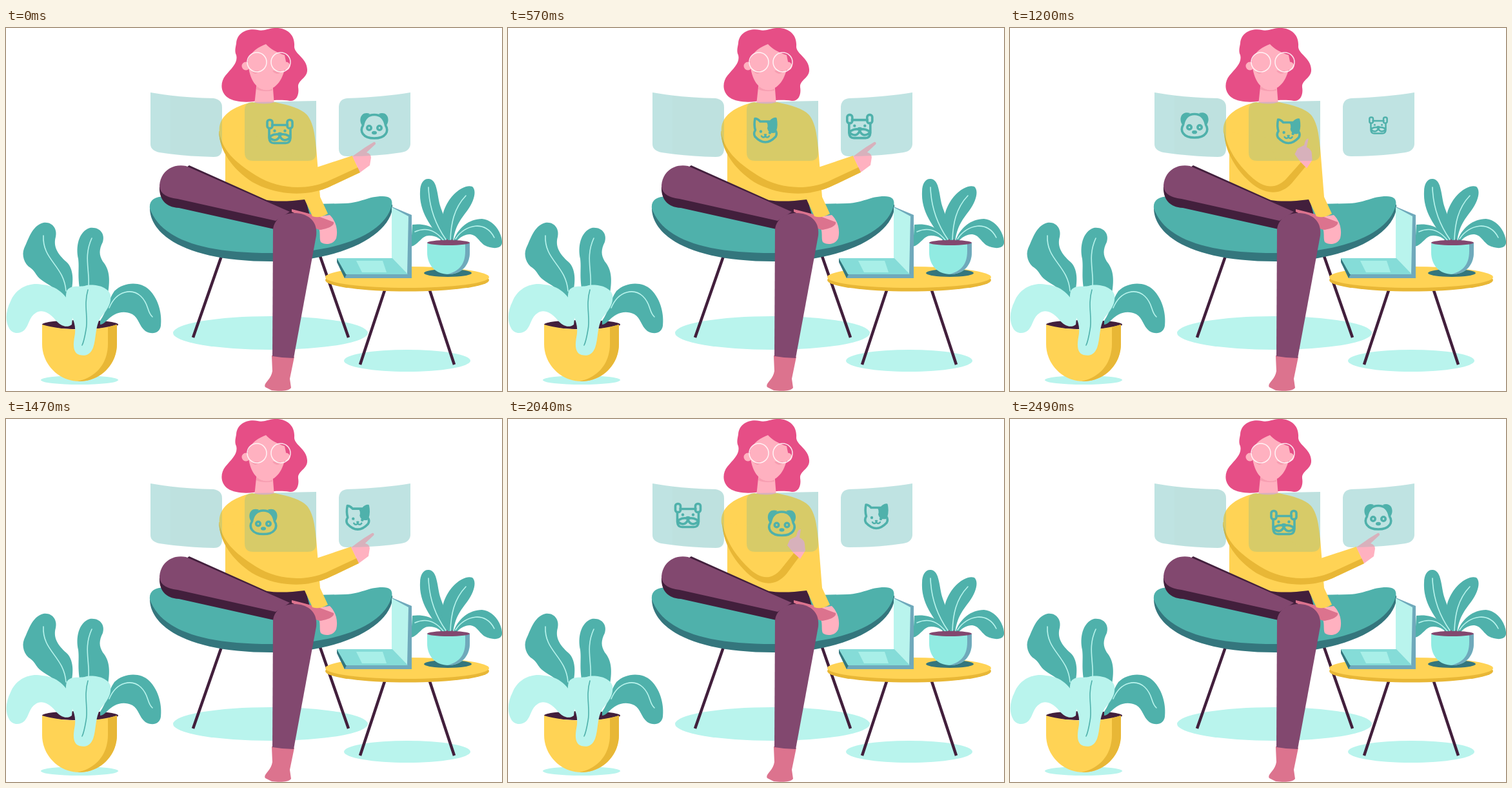
An HTML page that plays this animation: 769 px wide and 563 px high, repeating every 2610 ms.

```html
<!DOCTYPE html>
<html lang="en">
<head>
<meta charset="utf-8">
<title>Swiping cards</title>
<style>
  html, body { margin: 0; width: 100%; height: 100%; overflow: hidden; background: #fff; }
  svg { display: block; width: 100vw; height: 100vh; }
  .teal { fill: #4fb1ab } .deep { fill: #34767d } .mint { fill: #b9f4ed } .aqua { fill: #91ebe2 }
  .gold { fill: #ffd355 } .amber { fill: #e8b736 } .plum { fill: #82486f } .dark { fill: #421f3c }
  .skin { fill: #ffb1c0 } .rose { fill: #dc738e } .hair { fill: #e64e86 } .blue { fill: #6fa9bb }
  .line { fill: none; stroke-linecap: round; stroke-linejoin: round; }
  .vein { stroke: #b9f4ed; stroke-width: 1.6 }
  .leg { stroke: #421f3c; stroke-width: 4.5; stroke-linecap: butt }
  .icon { fill: none; stroke: #4fb1ab; stroke-width: 3.6; stroke-linecap: round; stroke-linejoin: round }
  .icon .solid { fill: #4fb1ab; stroke: none }
</style>
</head>
<body>
<svg viewBox="0 0 769 563">
  <defs>
    <g id="panels" class="teal">
      <path d="M224 100Q270 108 322 109Q335 111 335 123V187Q335 200 322 200Q275 199 238 193Q224 190 224 180Z"/>
      <path d="M370 127Q370 115 382 115L481 113V193Q481 206 468 206H383Q370 206 370 193Z"/>
      <path d="M516 122Q517 110 529 109Q585 107 627 100V180Q626 191 613 193Q575 199 529 199Q516 199 516 187Z"/>
    </g>
  </defs>

  <!-- floor shadows -->
  <g class="mint">
    <ellipse cx="410" cy="473" rx="151" ry="26"/>
    <ellipse cx="622" cy="516" rx="98" ry="17"/>
    <ellipse cx="114" cy="546" rx="60" ry="7"/>
  </g>

  <!-- large plant -->
  <ellipse class="dark" cx="115" cy="460" rx="59" ry="7"/>
  <path class="teal" d="M94 440C88 404 66 400 54 390C46 384 46 378 38 372C28 366 24 352 28 342C34 330 40 306 58 302C72 300 80 312 77 324C72 342 84 354 95 364C106 376 104 396 101 410V440Z"/>
  <path class="teal" d="M116 412C110 388 114 374 112 358C108 340 112 316 130 310C146 308 154 320 150 332C144 344 144 352 150 362C160 374 162 388 158 412Z"/>
  <path class="line vein" d="M58 322C56 360 90 368 93 408M133 326C120 354 130 376 128 400"/>
  <path class="gold" d="M56 460C90 470 140 470 172 460V490C172 522 146 548 114 548C82 548 56 522 56 490Z"/>
  <path class="amber" d="M158 464L172 460V490C172 524 144 549 111 548C142 541 158 518 158 490Z"/>
  <path class="teal" d="M146 454C156 440 158 422 168 408C182 394 208 392 222 406C238 422 242 446 240 462C238 474 226 476 216 470C206 462 206 450 196 444C180 436 166 444 158 452C154 456 150 460 146 460Z"/>
  <path class="line vein" d="M160 434C172 406 196 404 209 416C222 428 218 440 227 448"/>
  <path class="mint" d="M102 460C94 466 84 462 76 452C66 440 54 436 46 442C36 448 36 460 29 468C22 475 10 475 5 466C-2 454 0 438 7 424C16 402 38 394 56 398C84 400 98 420 104 440Z"/>
  <path class="mint" d="M94 408C100 398 112 402 122 400C134 396 158 400 162 414C164 430 154 440 146 450C138 464 140 482 135 496C130 508 122 509 114 507C104 504 104 492 106 480C110 464 104 450 98 438C92 428 92 416 94 408Z"/>
  <path class="line vein" style="stroke:#4fb1ab" d="M127 406C120 430 128 450 124 468C122 480 121 486 118 492"/>

  <!-- chair -->
  <path class="line leg" d="M334 354L290 480M487 354L531 480"/>
  <path class="deep" d="M223 278C222 322 282 362 411 362C536 362 602 312 599 274Z"/>
  <path class="teal" d="M223 280C221 264 236 258 262 263L480 273L526 272C552 271 560 261 584 261C596 261 600 266 598 276C586 318 520 349 411 349C292 349 238 322 223 280Z"/>

  <!-- table -->
  <path class="line leg" d="M588 404L549 522M656 404L695 522"/>
  <ellipse class="amber" cx="622" cy="391" rx="127" ry="17.5"/>
  <ellipse class="gold" cx="622" cy="386.500" rx="127" ry="16.500"/>
  <ellipse class="deep" cx="685" cy="380" rx="37" ry="6"/>

  <!-- small plant -->
  <g class="teal">
    <path d="M678 332C664 314 640 288 642 254C642 240 648 233 656 234C668 236 668 254 672 272C677 290 686 302 685 332Z"/>
    <path d="M685 332C672 310 674 290 684 272C694 254 712 242 723 246C730 252 726 268 716 282C704 298 696 308 693 332Z"/>
    <path d="M693 332C700 310 718 296 738 296C758 298 770 320 769 334C767 344 752 342 742 337C732 330 730 320 718 320C708 321 702 326 698 332Z"/>
    <path d="M681 332C672 312 654 302 630 305L628 339C640 336 644 322 656 322C668 322 674 328 677 332Z"/>
  </g>
  <path class="line vein" d="M655 247C656 280 668 308 682 328M713 260C694 280 690 304 689 328M697 327C712 304 744 298 757 325M678 329C666 314 652 308 634 316"/>
  <path class="aqua" d="M653 333H719V348C719 368 706 382 686 382C666 382 653 368 653 348Z"/>
  <path class="blue" d="M712 335L719 333V348C719 370 703 383 684 382C704 377 712 365 712 346Z"/>
  <ellipse class="plum" cx="686" cy="333" rx="33" ry="4"/>
  <path class="plum" d="M672 333L674 328L679 333L684 327L687 333L692 327L694 333L698 328L700 333Z"/>

  <!-- laptop -->
  <path class="blue" d="M598 277L629 290V388H620L598 357Z"/>
  <path class="mint" d="M598 278L624 292L622 382L598 357Z"/>
  <path class="blue" d="M513 357L527 382H629V388H525L513 363Z"/>
  <path class="deep" d="M513 357L528 382L525 388L513 363Z"/>
  <path fill="#85dcd8" d="M513 357H599L623 382H527Z"/>
  <path fill="#a8efe8" d="M543 361H584L590 379H552Z"/>

  <use href="#panels" opacity=".18"/>

  <!-- head -->
  <path class="hair" d="M357 24C358 6 376 0 390 3C400 6 408 -1 422 0C440 2 448 14 447 28C446 40 466 46 467 64C468 78 452 80 453 92C455 104 450 114 440 113C420 110 410 114 394 112C378 116 356 116 344 108C332 100 332 84 340 74C350 62 360 54 357 42C354 36 356 30 357 24Z"/>
  <path class="skin" d="M389 82H413L416 120H385Z"/>
  <path fill="#f79eb1" d="M389 90C396 97 407 98 413 94V97C404 99 394 98 388 95Z"/>
  <circle class="skin" cx="372" cy="59" r="6.500"/>
  <circle class="skin" cx="434" cy="59" r="6.500"/>
  <path class="skin" d="M403 25C392 29 380 36 375 50C376 76 386 96 404 96C422 94 432 74 434 52L432 42C420 38 409 32 403 25Z"/>
  <path fill="#f79eb1" d="M381 66H392Q390 71 386 71Q382 70 381 66ZM413 66H427Q425 71 420 71Q415 70 413 66Z"/>
  <g class="line" stroke="#fff" stroke-width="1.500" opacity=".85">
    <circle cx="389" cy="53" r="15"/><circle cx="426" cy="53" r="15"/>
  </g>

  <!-- far hand, torso and legs -->
  <path class="dark" d="M390 258L464 264L472 294L410 290Z"/>
  <path class="skin" d="M476 294L502 290C512 300 515 314 512 326C508 336 494 337 488 332C485 326 489 316 483 306Z"/>
  <path class="rose" d="M443 281C462 286 480 290 492 295L508 301C510 306 500 311 488 313C474 312 466 296 443 285Z"/>
  <path class="gold" d="M331 162C328 138 350 122 382 115Q401 120 417 115C440 120 457 125 466 134C477 146 479 168 481 186L487 262L499 288Q486 296 475 292L463 266C430 270 405 270 380 261L340 242V190Z"/>
  <path class="dark" d="M238 246C237 266 248 278 268 279L416 312L440 283L284 213Z"/>
  <path class="plum" d="M238 244C240 222 258 210 279 214L440 285L418 299L266 265C248 263 238 256 238 244Z"/>
  <path class="rose" d="M412 508L447 510L440 544L442 558C438 564 422 563 412 562L402 557C398 551 411 546 413 532Z"/>
  <path class="plum" d="M414 312C416 296 430 286 450 287C472 289 483 302 481 322L446 512Q430 512 413 509Z"/>

  <!-- near arm -->
  <path id="sleeve" class="gold"/>
  <path id="shade" class="amber"/>
  <path id="hand" class="skin"/>

  <use href="#panels" opacity=".22"/>

  <!-- card icons: dog, cat, panda -->
  <g class="icon">
    <rect x="-19.500" y="-18" width="8" height="13" rx="3.500"/>
    <rect x="11.500" y="-18" width="8" height="13" rx="3.500"/>
    <path d="M-12 -10H12M-16.500 -4V10Q-16 18 -9 18H9Q16 18 16.500 10V-4M0 5C-6 3 -13 5 -16 9M0 5C6 3 13 5 16 9M0 6C-2 14 -9 15 -14 11M0 6C2 14 9 15 14 11"/>
    <g class="solid"><circle cx="-8" cy="-1" r="2.200"/><circle cx="8" cy="-1" r="2.200"/><ellipse cy="4" rx="4" ry="2.800"/></g>
  </g>
  <g class="icon">
    <path d="M-16 -18Q-12 -18 -8 -13.500H8Q12 -18 16 -18Q18 -8 15.500 0Q19 5 16 10Q8 18.500 0 18.500Q-8 18.500 -16 10Q-19 5 -15.500 0Q-18 -8 -16 -18Z"/>
    <path class="solid" d="M1 -14H8Q12 -18 16 -18Q18 -8 15 4Q5 6 3 -3Q5 -9 1 -14Z"/>
    <circle class="solid" cx="-7" cy="2" r="2.200"/><circle class="solid" cx="7" cy="4" r="2.200"/>
    <path stroke-width="2.500" d="M-6 9Q-3 13 0 9Q3 13 6 9M-1 7H1"/>
  </g>
  <g class="icon">
    <path d="M0 -16.500C12 -16.500 16 -8 17.500 0C23 9 18 20 0 20C-18 20 -23 9 -17.500 0C-16 -8 -12 -16.500 0 -16.500Z"/>
    <path class="solid" d="M-18 1C-25 -6 -22 -23 -7 -18Q-16 -10 -18 1ZM18 1C25 -6 22 -23 7 -18Q16 -10 18 1Z"/>
    <circle cx="-8" cy="4" r="3.200"/><circle cx="8" cy="4" r="3.200"/>
    <ellipse class="solid" cy="11.500" rx="4" ry="2.800"/>
  </g>
</svg>
<script>
const LOOP = 2610, SWIPE = 900, STEP = 30;
const slots = [[279, 149.500], [424.500, 160.500], [571, 151]];
const icons = document.querySelectorAll('.icon');

// Each arm part has a pose reaching right and a pose folded left.
const outerEdge = [
  'M330 160C331 190 350 218 382 239C420 260 465 262 500 247L549 224',
  'M332 160C333 190 348 215 366 234C386 256 412 264 432 240L452 213'];
const innerEdge = [
  'L546 216L498 238C464 252 422 250 388 229C352 206 336 190 330 160Z',
  'L444 207L424 232C408 252 390 248 372 230C352 210 338 190 332 160Z'];
const upperEdge = ['L537 198L482 216L400 170Z', 'L436 203L415 225L400 170Z'];
const poses = {
  sleeve: outerEdge.map((d, i) => d + upperEdge[i]),
  shade: outerEdge.map((d, i) => d + innerEdge[i]),
  hand: [
    'M537 199L547 192L557 185L570 177Q573 176 573 180L559 193Q566 195 566 201L564 213L549 224Z',
    'M443 208L433 196L437 187L447 182Q449 170 454 171L452 184Q460 188 460 194L461 204L453 217Z']
};

const ease = (t, from, to) => {
  const x = Math.min(1, Math.max(0, (t - from) / (to - from)));
  return x * x * (3 - 2 * x);
};
const lerp = (a, b, k) => a + (b - a) * k;

function mixPaths([a, b], k) {
  const ends = b.match(/\d+/g);
  let i = 0;
  return a.replace(/\d+/g, n => lerp(+n, +ends[i++], k).toFixed(2));
}

function place(icon, from, to, k, scale) {
  const [x, y] = [0, 1].map(i => lerp(slots[from][i], slots[to][i], k));
  icon.setAttribute('transform', `translate(${x} ${y}) scale(${scale})`);
}

function draw(now) {
  const time = Math.floor(now % LOOP / STEP) * STEP;
  const turn = Math.floor(time / SWIPE), t = time % SWIPE;

  const fold = t < 240 ? ease(t, 0, 240) : 1 - ease(t, 240, 600);
  for (const id in poses) document.getElementById(id).setAttribute('d', mixPaths(poses[id], fold));

  const slide = ease(t, 240, 690);
  place(icons[turn], 1, 2, slide, 1);
  place(icons[(turn + 1) % 3], 0, 1, slide, ease(t, 60, 220));
  place(icons[(turn + 2) % 3], 2, 2, 0, 1 - ease(t, 240, 405));
  requestAnimationFrame(() => draw(performance.now()));
}
draw(0);
</script>
</body>
</html>
```
